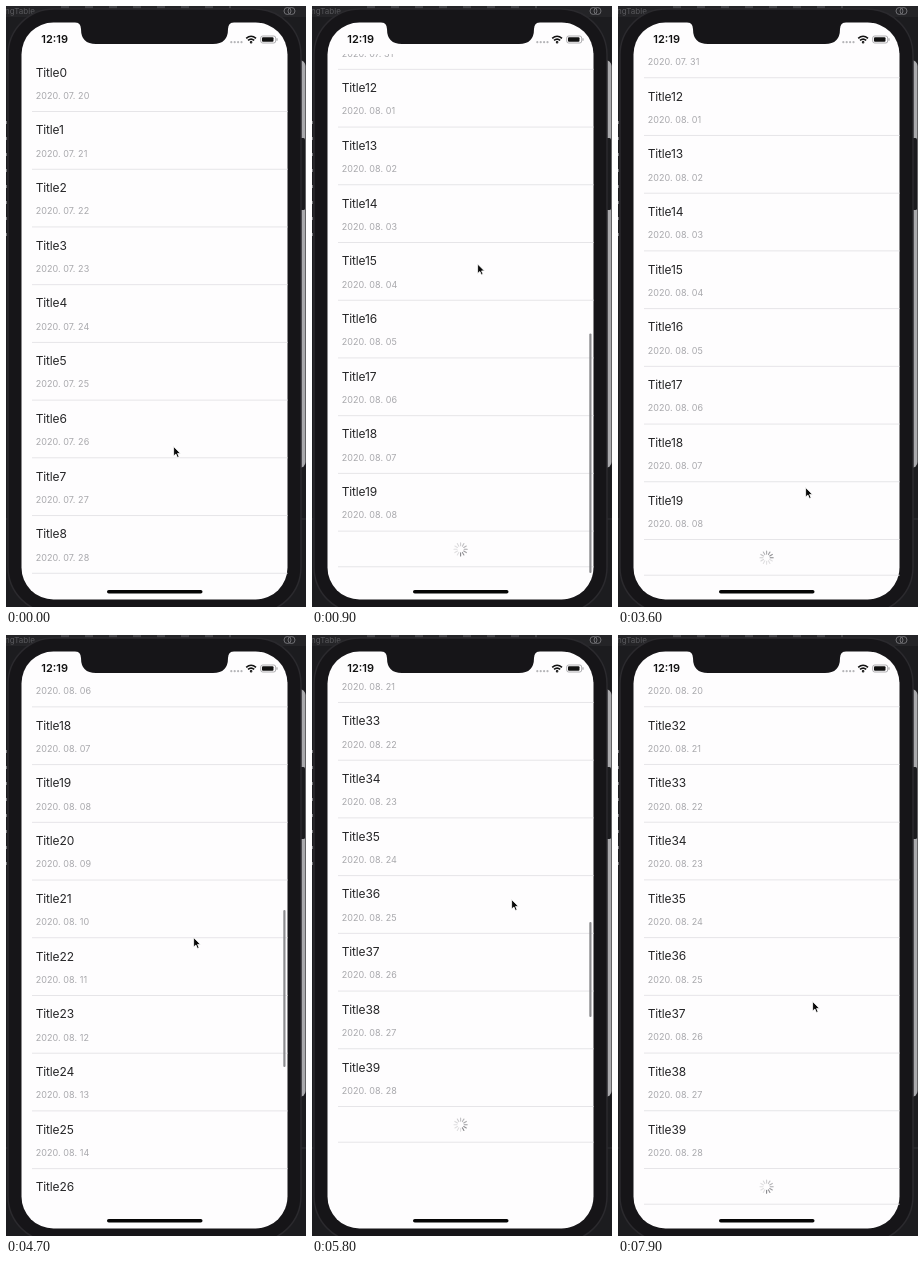
Write an HTML page that moves like this. It is 300x601 px and loops after 8000 ms.

```html
<!DOCTYPE html>
<html lang="en">
<head>
<meta charset="utf-8">
<title>Endless list</title>
<style>
html, body { margin: 0; width: 100%; height: 100%; overflow: hidden; background: #1c1c1f; }
svg { display: block; width: 300px; height: 601px; }
text { font-family: Inter, Roboto, sans-serif; }
.title { font-size: 12px; letter-spacing: -.14px; fill: #252527; }
.date { font-size: 9px; letter-spacing: .06px; fill: #a8a8ac; }
.line { stroke: #e6e5e8; stroke-width: 1; }
</style>
</head>
<body>
<svg viewBox="0 0 300 601">
  <defs>
    <clipPath id="view"><rect x="15.500" y="48" width="266" height="522"/></clipPath>
  </defs>

  <!-- desktop behind the phone -->
  <rect width="300" height="601" fill="#1c1c1f"/>
  <rect width="300" height="11" fill="#242427"/>
  <text x="-1" y="8" font-size="8" fill="#58585c">ngTable</text>
  <path d="M55 1H225" stroke="#434347" stroke-width="3" stroke-dasharray="8 16"/>
  <g fill="none" stroke="#707074">
    <circle cx="281.500" cy="5" r="3.500"/><circle cx="285.500" cy="5" r="3.500"/>
  </g>
  <rect x="280" y="54" width="19.500" height="408" rx="6" fill="#a9a9ac"/>
  <path d="M.5 115V235" stroke="#77777b" stroke-dasharray="3 13"/>
  <path d="M0 513H300" stroke="#303034"/>

  <!-- phone -->
  <rect x="294" y="132" width="5" height="72" rx="1.500" fill="#1b1b1e"/>
  <rect x="2" y="3" width="293" height="604" rx="46" fill="#161518" stroke="#2b2a2e" stroke-width="1.500"/>
  <rect x="15.500" y="16.500" width="266" height="577" rx="32" fill="#fefdfe"/>
  <path d="M69 16H228q-6 1-6 7q0 15-15 15H90q-15 0-15-15q0-6-6-7z" fill="#161518"/>

  <!-- status bar -->
  <text x="35.300" y="37.300" font-size="11" font-weight="600" fill="#111">12:19</text>
  <path d="M225.300 36.200H236" stroke="#b5b5b8" stroke-width="2.200" stroke-linecap="round" stroke-dasharray="0 3.400"/>
  <g fill="none" stroke="#111" stroke-width="1.600">
    <path d="M240.200 32.400q4.900-4.300 9.800 0M242 34.400q3.100-2.700 6.200 0"/>
    <circle cx="245.100" cy="36.200" r=".5"/>
  </g>
  <rect x="254.700" y="30" width="15" height="7" rx="2" fill="none" stroke="#9a9a9d" stroke-width=".8"/>
  <rect x="256" y="31.200" width="11.500" height="4.600" rx="1" fill="#111"/>
  <path d="M271 32.300v2.400" stroke="#9a9a9d"/>

  <g clip-path="url(#view)">
    <g id="list"></g>
    <rect id="bar" x="277.300" width="2.200" rx="1.100" fill="#8c8c8f"/>
  </g>
  <rect x="101" y="583.900" width="95.500" height="3.500" rx="1.750" fill="#050505"/>
  <path id="cursor" d="M0 0V9.600L2.300 7.500 3.800 11 5.500 10.300 4 6.900H6.900Z" fill="#0a0a0a" stroke="#fff" stroke-width=".8"/>
</svg>
<script>
const LOOP = 8000, STEP = 100;
const ROW = 57.72, TOP = 48, FOOTER = 36, PAGE = 20, SPOKES = 12;
const REST = 668.7;                  // end of the first page
const END = REST + PAGE * ROW;       // end of the second page
const OVER_1 = 8.4, OVER_2 = 62;     // how far each fling overshoots
const FLICK = 1002;                  // travel of the first flick on page two
const LOADED = 3900, SECOND_DRAG = 4400;

const $ = id => document.getElementById(id);
const list = $('list'), bar = $('bar'), cursor = $('cursor');

function add(parent, tag, attrs, text) {
  const el = document.createElementNS('http://www.w3.org/2000/svg', tag);
  for (const key in attrs) el.setAttribute(key, attrs[key]);
  if (text) el.textContent = text;
  return parent.appendChild(el);
}

function dateOf(n) {
  return new Date(Date.UTC(2020, 6, 20 + n)).toISOString().slice(0, 10).replace(/-/g, '. ');
}

const rows = Array.from({ length: 2 * PAGE }, (_, n) => {
  const row = add(list, 'g', { transform: `translate(0 ${TOP + n * ROW})` });
  add(row, 'text', { class: 'title', x: 29.7, y: 22.6 }, 'Title' + n);
  add(row, 'text', { class: 'date', x: 29.7, y: 44.9 }, dateOf(n));
  add(row, 'path', { class: 'line', d: `M26 ${ROW - .2}H282` });
  return row;
});

const footer = add(list, 'g', {});
add(footer, 'path', { class: 'line', d: `M26 ${FOOTER - .5}H282` });
const spinner = add(footer, 'g', { transform: 'translate(148.600 18)' });
const spokes = Array.from({ length: SPOKES }, (_, i) => add(spinner, 'path', {
  d: 'M0-3.600V-6.600', stroke: '#858589', 'stroke-width': 1.1,
  'stroke-linecap': 'round', transform: `rotate(${i * 360 / SPOKES})`
}));

// Sine ease from 0 at time a to 1 at time b.
function ease(t, a, b) {
  const p = Math.min(1, Math.max(0, (t - a) / (b - a)));
  return (1 - Math.cos(Math.PI * p)) / 2;
}

// Flings past the end of each page, then springs back.
function scrollAt(t) {
  return (REST + OVER_1) * ease(t, 0, 900) - OVER_1 * ease(t, 900, 1600)
    + FLICK * ease(t, 4300, 5300)
    + (END + OVER_2 - REST - FLICK) * ease(t, 5300, 5800)
    - OVER_2 * ease(t, 5800, 6500);
}

const cursorMoves = [
  { from: 0, to: 500, dx: -2, dy: -182.5 },
  { from: 1200, to: 2300, dx: 22, dy: 223.5 },
  { from: 4300, to: 4700, dx: 0, dy: -179 },
  { from: 4700, to: 5300, dx: 10, dy: 80 },
  { from: 5300, to: 5800, dx: 2, dy: -118 },
  { from: 6380, to: 7000, dx: -5, dy: 102 }
];

function cursorAt(t) {
  return cursorMoves.reduce(([x, y], m) => {
    const k = ease(t, m.from, m.to);
    return [x + m.dx * k, y + m.dy * k];
  }, [167.6, 440.5]);
}

// The bar shrinks by the overshoot; on page two it lags, then drops to the end.
function barAt(t, scroll) {
  if (t < SECOND_DRAG) {
    const over = Math.max(0, scroll - REST);
    return { top: 51 + 268 * Math.min(1, scroll / REST) + over, size: 248 - over };
  }
  return {
    top: 275 + 12 * ease(t, 4700, 5800) + 122 * ease(t, 5800, 6500),
    size: 157 - Math.max(0, scroll - END)
  };
}

function pulse(t, on, off) {
  return ease(t, on, on + 100) - ease(t, off, off + 300);
}

function draw(t) {
  const scroll = scrollAt(t);
  const loaded = t >= LOADED, moving = t >= SECOND_DRAG;
  list.setAttribute('transform', `translate(0 ${-scroll})`);
  rows.forEach((row, n) => {
    row.style.display = n < PAGE || loaded ? '' : 'none';
  });

  // The old footer line stays until the list moves again.
  footer.setAttribute('transform', `translate(0 ${TOP + (moving ? 2 : 1) * PAGE * ROW})`);
  spinner.style.display = loaded && !moving ? 'none' : '';
  const head = Math.floor(t / 1000 * SPOKES);
  spokes.forEach((spoke, i) => {
    const age = (head - i + LOOP) % SPOKES;
    spoke.style.opacity = Math.max(.25, 1 - age * .1);
  });

  const { top, size } = barAt(t, scroll);
  bar.setAttribute('y', top);
  bar.setAttribute('height', size);
  bar.style.opacity = pulse(t, 0, 1900) + pulse(t, 4300, 7000);

  cursor.setAttribute('transform', `translate(${cursorAt(t)})`);
}

const start = performance.now();
function tick() {
  const t = (performance.now() - start) % LOOP;
  draw(Math.floor(t / STEP) * STEP);
  requestAnimationFrame(tick);
}
tick();
</script>
</body>
</html>
```
